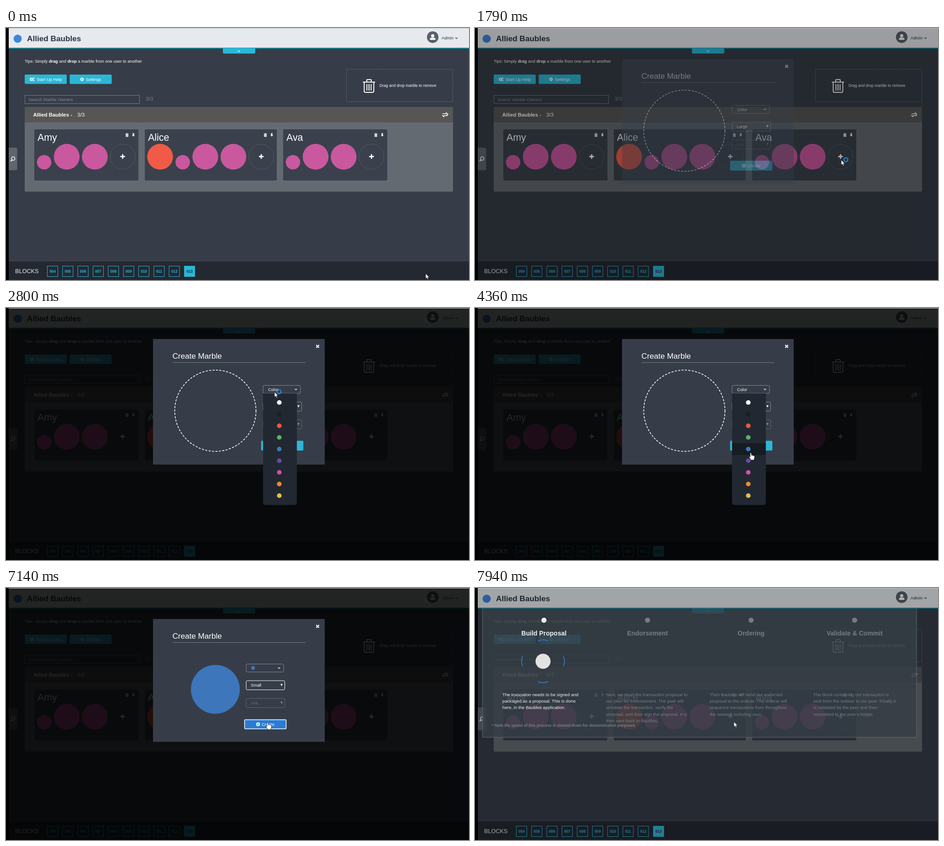
An HTML page for the animation above (8 s loop, 1014 px wide and 552 px high).

```html
<!DOCTYPE html>
<html lang="en">
<head>
<meta charset="utf-8">
<title>Create marble</title>
<style>
html, body { margin: 0; width: 100%; height: 100%; overflow: hidden; background: #000; }
svg { display: block; width: 100vw; height: 100vh; font: 9.27px "Liberation Sans", Arial, sans-serif; fill: #fff; }
.line { fill: none; stroke: #fff; }
.bold { font-weight: bold; }
</style>
</head>
<body>
<svg id="stage" viewBox="0 0 1014 552"></svg>
<script>
const CYAN = '#2cb6d6', PINK = '#c9589f', BLUE = '#3d76bb';
const LOOP = 8000, FADE = 400;

const rect = (x, y, w, h, a = '') => `<rect x="${x}" y="${y}" width="${w}" height="${h}" ${a}/>`;
const circle = (x, y, r, a = '') => `<circle cx="${x}" cy="${y}" r="${r}" ${a}/>`;
const path = (d, a = '') => `<path d="${d}" ${a}/>`;
const text = (x, y, s, size = 9.27, a = '') => `<text x="${x}" y="${y}" font-size="${size}" ${a}>${s}</text>`;
const group = (a, ...parts) => `<g ${a}>${parts.join('')}</g>`;
const at = (x, y, ...parts) => group(`transform="translate(${x} ${y})"`, ...parts);
const range = n => [...Array(n).keys()];

// Icons
const chevron = (x, y, color = '#fff') => path(`M${x - 2.5} ${y - 1.2}l2.5 2.5 2.5-2.5`, `class="line" style="stroke:${color}" stroke-width="1.2"`);
const gear = (x, y, r) => circle(x, y, r, `class="line" stroke-width="${r * 0.75}"`) +
  circle(x, y, r * 1.45, `class="line" stroke-width="${r * 0.6}" stroke-dasharray="${r * 0.57}"`);
const plus = (x, y, r, w, color = '#fff') => path(`M${x - r} ${y}h${2 * r}M${x} ${y - r}v${2 * r}`, `stroke="${color}" stroke-width="${w}"`);
const miniTrash = (x, y) => path(`M${x - 3.5} ${y - 2.5}h7M${x - 1.5} ${y - 3.5}h3`, 'class="line" stroke-width="1.2"') +
  path(`M${x - 2.8} ${y - 1.5}h5.6v5.3h-5.6z`) + path(`M${x - 1} ${y - 0.6}v3.4m2-3.4v3.4`, 'stroke="#3a414c" stroke-width=".6"');
const pin = (x, y) => path(`M${x - 2} ${y - 4}h4v1h-.6v3q1.6.6 1.6 1.8h-6q0-1.2 1.6-1.8v-3h-.6zM${x - 0.5} ${y + 1.5}h1l-.5 3z`);
const triangle = (x, y, a = '') => path(`M${x - 2.4} ${y - 2.5}h4.8l-2.4 5z`, a);

const slot = x => circle(x, 282, 27.2, 'class="slot" fill="none" stroke="#68707a" stroke-dasharray="2 1.5"') + plus(x, 281.5, 5, 2.8);

function card(x, w, name, first = '') {
  const s = x + (first ? 61.5 : 0);
  return rect(x, 222, w, 112, 'rx="2" fill="#3a414c"') + text(x + 7, 247, name, 21.4) +
    miniTrash(x + w - 25, 234.5) + pin(x + w - 11, 234.5) +
    (first && circle(x + 33.5, 282, 28.2, `fill="${first}"`)) +
    group(`fill="${PINK}"`, circle(s + 21.5, 294, 15.8), circle(s + 71, 282, 28.2), circle(s + 132.5, 282, 28.2)) +
    slot(s + 193.5);
}

const block = i => {
  const x = 90.5 + i * 33.33, last = i === 9;
  return rect(x, 521.5, 23, 23, `fill="${last ? CYAN : 'none'}" stroke="${CYAN}"`) +
    text(x + 11.5, 536, String(i + 4).padStart(3, '0'), 8.2, `class="bold" text-anchor="middle" fill="${last ? '#232831' : CYAN}"`);
};

const trash = group('class="line" stroke-width="2"',
  path('M781.5 118.5h27M790 118v-3.5q0-1.5 1.5-1.5h7q1.5 0 1.5 1.5v3.5M784.5 119v19q0 3 3 3h15q3 0 3-3v-19'),
  path('M790.5 123v14m4.5-14v14m4.5-14v14'));

const page = [
  rect(6, 0, 1008, 552, 'fill="#363d48"'),
  rect(6, 0, 1008, 43, 'fill="#e6eaee"'), rect(6, 43, 1008, 2, 'fill="#1ba4b2"'),
  circle(25.5, 23.5, 9, 'fill="#3f86dc"'),
  text(46, 28.5, 'Allied Baubles', 17.2, 'class="bold" fill="#2d3540"'),
  circle(934.5, 20, 12.7, 'fill="#5a606b"'), circle(934.5, 17, 3.5), path('M928.5 26v-2q0-3 4-3h4q4 0 4 3v2z'),
  text(954, 25, 'Admin', 9.27, 'fill="#2d3540"'), chevron(986.5, 22, '#2d3540'),
  path('M475 44h71v9q0 3-3 3h-65q-3 0-3-3z', `fill="${CYAN}"`), chevron(510, 50.5),
  text(41, 76, 'Tips: Simply <tspan class="bold">drag</tspan> and <tspan class="bold">drop</tspan> a marble from one user to another'),
  rect(41, 102, 92, 20.5, `rx="2" fill="${CYAN}"`), gear(55.5, 112.5, 2.2), gear(60.5, 110, 1.2), gear(60.5, 115, 1.2), text(67, 115.5, 'Start Up Help'),
  rect(139.5, 102, 92, 20.5, `rx="2" fill="${CYAN}"`), gear(166.5, 112.3, 2.3), text(175, 115.5, 'Settings'),
  rect(745.5, 90.5, 233, 71, 'fill="none" stroke="#6b737c" stroke-dasharray="2.2 1.6"'), trash,
  text(818, 129, 'Drag and drop marble to remove', 8.6),
  rect(41.5, 147.5, 251, 18, 'fill="none" stroke="#737a82"'), text(49, 159.5, 'Search Marble Owners', 9.5, 'fill="#858b93"'),
  text(306, 159.3, '3/3', 11.8, 'fill="#7b828a"'),
  rect(41, 173, 938, 185.5, 'rx="2" fill="#646a71"'), rect(41, 173, 938, 35, 'fill="#565656"'), rect(41, 207.5, 938, 1, 'fill="#707479"'),
  text(59.5, 194, 'Allied Baubles -', 11.4, 'class="bold"'), text(156, 194, '3/3', 11.6),
  path('M956 188h8v-2.5l4 3.4-4 3M967 192h-8v2.5l-4-3.4', 'class="line" stroke-width="1.4"'),
  card(62, 228, 'Amy'), card(304, 289, 'Alice', '#f15a47'), card(607, 228, 'Ava'),
  path('M6 262h15q3.500 0 3.500 3.500v42.500q0 3.500-3.500 3.500h-15z', 'fill="#60666e"'),
  circle(15.8, 286, 3.7, 'class="line" stroke-width="1.5"'), path('M13.2 288.8l-3 3.200', 'class="line" stroke-width="2"'),
  rect(6, 510, 1008, 42, 'fill="#232831"'), rect(6, 509.5, 1008, 1, 'fill="#4b525c"'),
  text(20, 537, 'BLOCKS', 12.7, 'fill="#eee"'), ...range(10).map(block)
];

const swatches = ['#fff', '#1c1f26', '#f5553f', '#5fb067', BLUE, '#674ba8', '#cf52a4', '#ee8c2e', '#dcc34b'];
const form = [
  rect(563, 169.5, 82, 17.5, 'rx="2.5" class="line" style="stroke:#858b93"'),
  text(574, 182, 'Color', 9.27, 'id="colorLabel"'), circle(578, 178, 4.3, `id="colorDot" fill="${BLUE}"`), chevron(635, 178),
  rect(563, 206, 84.5, 20, 'id="size" rx="2.5" fill="none" stroke="#858b93"'), text(573, 219, '', 9.27, 'id="sizeLabel"'), triangle(640.5, 215.5),
  rect(563, 245, 84.5, 20, 'rx="2.500" fill="none" stroke="#626973"'), text(573, 258, 'Ava', 9.27, 'fill="#69707a"'), triangle(640.5, 254.5, 'fill="#8a9098"'),
  rect(559.5, 291.5, 91, 20, 'id="create" rx="1.5" stroke-width="1.500"'),
  circle(589, 301.5, 4.2), plus(589, 301.5, 2.5, 1.3, CYAN), text(597, 305, 'Create'),
  group('id="options"', rect(563.5, 226.5, 84, 43, 'fill="#363d48" stroke="#858b93"'), rect(564, 227, 83, 21, 'id="optionMark" fill="#1e90ff"'),
    text(573, 241, 'Large'), text(573, 262, 'Small'))
];
const modal = [
  rect(322, 68, 376, 275, 'id="box" fill="#363d48"'),
  text(364.5, 111, 'Create Marble', 17.1), rect(365, 119, 291, 1, 'fill="#6f8586"'),
  path('M679.500 81l6 6m0-6l-6 6', 'class="line" stroke-width="2.4"'),
  circle(458.5, 225, 89, 'id="preview" stroke="#fff" stroke-width="1.6" stroke-dasharray="4.5 3"'),
  group('id="form"', ...form),
  group('id="palette"', path('M563 187h74v238.500q0 6-6 6h-62q-6 0-6-6z', 'fill="#222831"'), rect(563, 0, 74, 25.5, 'id="row" fill="#171b22"'),
    ...swatches.map((c, i) => circle(598.5, 207 + i * 25.5, 5.1, `fill="${c}"`)))
];

const steps = [
  ['Build Proposal', 'The invocation needs to be signed and', 'packaged as a proposal. This is done', 'here, in the Baubles application.'],
  ['Endorsement', 'Next, we send the transaction proposal to', 'our peer for endorsement. The peer will', 'simulate the transaction, verify the', 'proposal, and then sign the proposal. It is', 'then sent back to Baubles.'],
  ['Ordering', 'Then Baubles will send our endorsed', 'proposal to the orderer. The orderer will', 'sequence transactions from throughout', 'the network including ours.'],
  ['Validate &amp; Commit', 'The block containing our transaction is', 'sent from the orderer to our peer. Finally it', 'is validated by the peer and then', "committed to the peer's ledger."]
];
const story = [
  path('M16.5 45V327H967V45', 'fill="#353e46" fill-opacity=".82" stroke="#606a72"'),
  ...steps.map(([title, ...lines], i) => group(`fill="${i ? '#757c83' : '#f2f2f2'}"`,
    circle(151 + i * 226.8, 70.5, 5.6), text(151 + i * 226.8, 104, title, 14, 'class="bold" text-anchor="middle"'),
    ...lines.map((s, n) => text(60 + i * 227, 237 + n * 14.2, s, 9.7)))),
  circle(149, 160.5, 16.5, 'fill="#e2e2e2"'),
  ...range(4).map(i => path('M138 116q11-5 22 0', `class="line" style="stroke:#3a72b5" stroke-width="2" transform="rotate(${i * 90} 149 160.5)"`)),
  text(37, 304, '* Note the speed of this process is slowed down for demonstration purposes', 8.6, 'class="bold" fill="#757c83"')
];

const cursor = [
  path('M0 0V11.2L2.600 8.800 4.300 12.800 6.200 12 4.500 8.200H8Z', 'id="arrow" stroke="#111" stroke-width=".7"'),
  path('M-1.300 1Q0-.8 1.300 1V5.500Q2.600 4.800 3.600 6 5 5.400 6 6.700 8.300 6.300 8.300 8.500V11L7 14V16H-.5V14L-3.500 10Q-4 8-2.800 8L-1.300 9.500Z', 'id="hand" stroke="#111" stroke-width=".7"'),
  circle(10.2, -0.5, 4.3, 'id="busy" fill="none" stroke="#1f8fee" stroke-width="2.200"')
];

const stage = document.getElementById('stage');
stage.innerHTML = group('', ...page) + rect(6, 0, 1008, 552, 'id="tint" fill="#000"') +
  group('id="modal"', ...modal) + group('id="story"', ...story) +
  rect(6, 0, 1008, 1, 'fill="#bfc2c5"') + group('id="cursor"', ...cursor);

const $ = Object.fromEntries([...stage.querySelectorAll('[id]')].map(e => [e.id, e]));
const hoverSlot = stage.querySelectorAll('.slot')[2];
const set = (el, attrs) => { for (const k in attrs) el.setAttribute(k, attrs[k]); };
const show = (el, on) => set(el, { visibility: on ? 'inherit' : 'hidden' });
const within = (v, a, b) => v >= a && v < b;
const clamp = v => Math.min(1, Math.max(0, v));
const swing = (t, start) => 0.5 - Math.cos(Math.PI * clamp((t - start) / FADE)) / 2;

// Pointer moves: start, end, x, y
const moves = [
  [30, 560, 811, 307], [830, 1390, 802, 289], [1900, 2350, 594, 200], [2390, 2570, 588, 184],
  [3370, 4220, 604, 310], [4260, 4360, 604, 317], [4850, 5280, 603, 217], [5470, 5510, 602, 215],
  [5690, 6310, 595, 250], [6490, 7140, 573, 294], [7150, 7220, 571, 296], [7840, 7900, 567, 293]
];
function pointer(t) {
  let x = 919, y = 538;
  for (const [start, end, toX, toY] of moves) {
    const p = clamp((t - start) / (end - start)), k = p * p * (3 - 2 * p);
    x += (toX - x) * k;
    y += (toY - y) * k;
  }
  return [x, y];
}

function draw(t) {
  const [x, y] = pointer(t);
  const picked = t >= 4670, small = t >= 6470;
  const listOpen = within(t, 2800, 4670), choosing = within(t, 5670, 6470);
  const overCreate = within(t, 4670, 7840) && within(y, 288, 309);
  const overSwatch = listOpen && y > 195;
  const hand = within(t, 870, 1620) || within(t, 2500, 2800) || overSwatch || overCreate;

  const shown = swing(t, 1620) * (1 - swing(t, 7440));
  set($.modal, { opacity: shown });
  set($.tint, { opacity: 0.85 * Math.max(shown, swing(t, 7780)) });
  set($.story, { opacity: clamp((t - 7840) / 100) });
  set(hoverSlot, { stroke: within(t, 870, 1620) ? '#fff' : '#68707a' });

  set($.box, { height: picked ? 269 : 275 });
  set($.preview, {
    cy: picked ? 222 : 225, r: small ? 53.5 : picked ? 87 : 89,
    fill: picked ? BLUE : 'none', stroke: picked ? 'none' : '#fff'
  });
  set($.form, { transform: `translate(${small ? -37 : picked ? -3 : 0} ${picked ? -3 : 0})` });
  show($.colorLabel, !picked);
  show($.colorDot, picked);
  $.sizeLabel.textContent = small ? 'Small' : 'Large';
  set($.size, { stroke: within(t, 5670, 7280) ? '#fff' : '#858b93' });
  set($.create, { fill: overCreate ? '#2a7cd3' : CYAN, stroke: overCreate ? '#fff' : CYAN });
  show($.options, choosing);
  set($.optionMark, { y: y < 245 ? 227 : 248 });
  show($.palette, listOpen);
  show($.row, overSwatch);
  set($.row, { y: 194.25 + 25.5 * Math.floor((y - 194.25) / 25.5) });

  set($.cursor, { transform: `translate(${x} ${y})` });
  show($.arrow, !hand);
  show($.hand, hand);
  show($.busy, within(t, 1620, 1980) || within(t, 2800, 3420));
}

function tick() {
  draw(performance.now() % LOOP);
  requestAnimationFrame(tick);
}
tick();
</script>
</body>
</html>
```
